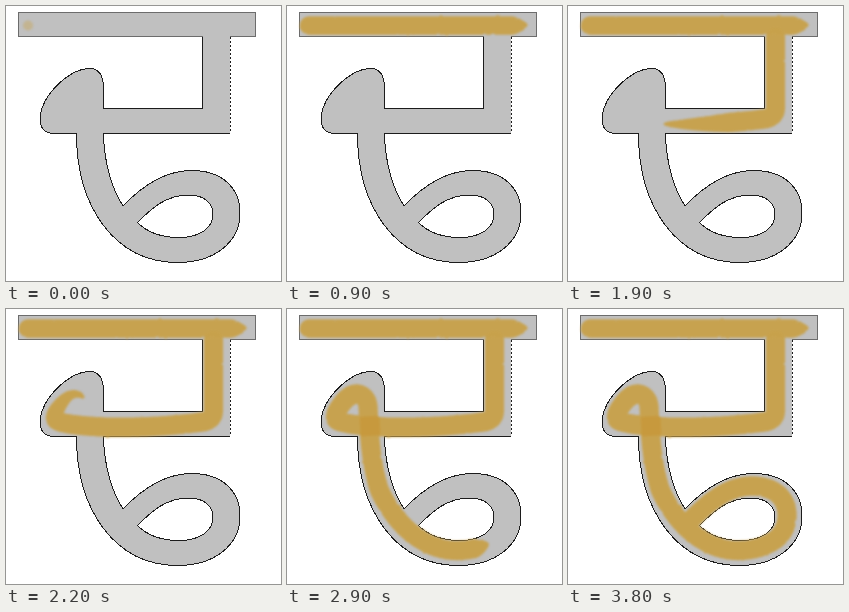
Recreate the animation shown at these times as an HTML page. Size 275x275 px, loop 3.9 s.

```html
<!DOCTYPE html>
<html lang="en">
<head>
<meta charset="utf-8">
<title>Letter tracing</title>
<style>
html, body { margin: 0; width: 100%; height: 100%; overflow: hidden; background: #fff; }
svg { display: block; width: 100vw; height: 100vh; }
</style>
</head>
<body>
<svg viewBox="0 0 275 275" xmlns="http://www.w3.org/2000/svg">
  <defs>
    <filter id="rough" filterUnits="userSpaceOnUse" x="0" y="0" width="275" height="275" color-interpolation-filters="sRGB">
      <feTurbulence type="fractalNoise" baseFrequency="0.12" numOctaves="2" seed="4" result="n"/>
      <feDisplacementMap in="SourceGraphic" in2="n" scale="2" xChannelSelector="R" yChannelSelector="G"/>
      <feGaussianBlur stdDeviation="0.9"/>
    </filter>
  </defs>
  <g fill="#c0c0c0" fill-rule="evenodd" shape-rendering="crispEdges">
    <path stroke="#1c1c1c"
      d="M224 127.5H97.5C98 157 106 183 117 200C136 180 158 164.5 186 164.5C216 164.5 234 182 234 207C234 238 206 256.5 172 256.5C108 256.5 70.5 200 70.5 127.5H48C38 127.5 34 122 34 112C36 88 64 62.5 84 62.5C94 62.5 97.5 71 97.5 83V102.5H196.5V30.5H224
      M131.5 216.5C146 202 160 189 183 189C198 189 207 197 207 208C207 222 194 231.5 173 231.5C156 231.5 141 226 131.5 216.5Z"/>
    <path stroke="#6c6c6c" d="M196.5 30.5H12.5V6.5H249.5V30.5H224"/>
    <path stroke="#c0c0c0" d="M197 30.5H224"/>
    <path stroke="#1c1c1c" stroke-dasharray="2 2" d="M224.5 31V127"/>
  </g>
  <g filter="url(#rough)" fill="#c8a24c">
    <path id="bar"/>
    <path id="body"/>
    <rect id="cross" x="73" y="107" width="20" height="20" rx="3" transform="rotate(-3 83 117)" fill="#c7973a" opacity="0.8"/>
  </g>
</svg>
<script>
const LOOP = 3900, STEP = 100;
const $ = id => document.getElementById(id);

function makePath(d) {
  const p = document.createElementNS("http://www.w3.org/2000/svg", "path");
  p.setAttribute("d", d);
  return p;
}

// Piecewise linear value through [time, value] pairs
function ramp(keys, t) {
  if (t <= keys[0][0]) return keys[0][1];
  for (let i = 1; i < keys.length; i++) {
    const [t0, v0] = keys[i - 1], [t1, v1] = keys[i];
    if (t <= t1) return v0 + (v1 - v0) * (t - t0) / (t1 - t0);
  }
  return keys[keys.length - 1][1];
}

// Each part continues where the previous one stops
const parts = [
  "M207.5 31V101Q207.5 112 196 113C165 117 130 119 97 118",
  "C80 117 62 116 51 112C44 109 53 96 60 89C68 82 79 84 81 97C82 120 83 150 92 180",
  "C105 210 133 241 169 241.5Q187 241.5 200 235",
  "C213 229 219 219 219 206C219 187 204 177 184 177C160 177 141 193 124 210"
];
const ends = parts.map((_, i) => makePath(parts.slice(0, i + 1).join("")).getTotalLength());

function stroke(el, d, radius, start, lengths, tapers) {
  const path = makePath(d), total = path.getTotalLength(), points = [];
  for (let s = 0; s <= total; s += 1.5) points.push([s, path.getPointAtLength(s)]);
  points.push([total, path.getPointAtLength(total)]);
  return t => {
    const head = ramp(lengths, t), taper = ramp(tapers, t);
    let out = "";
    if (t >= start) for (const [s, p] of points) {
      if (s > head) break;
      const k = taper > 0 ? Math.min(1, (head - s) / taper) : 1;
      const r = Math.max(radius * (0.15 + 0.85 * k ** 0.7), 5 * (1 - head / 30));
      out += `M${(p.x - r).toFixed(1)} ${p.y.toFixed(1)}a${r} ${r} 0 1 0 ${2 * r} 0a${r} ${r} 0 1 0 ${-2 * r} 0`;
    }
    el.setAttribute("d", out);
    el.setAttribute("opacity", Math.min(0.97, 0.4 + head / 40));
    return head;
  };
}

const drawBar = stroke($("bar"), "M22 19.5H239", 9.3, 0,
  [[0, 0], [500, 146], [720, 217]],
  [[0, 4], [100, 14]]);

const drawBody = stroke($("body"), parts.join(""), 9.7, 1300,
  [[1300, 4], [1900, ends[0]], [2500, ends[1]], [2900, ends[2]], [3400, ends[3]]],
  [[1300, 5], [1500, 20], [1900, 65], [2500, 36], [2900, 14], [3300, 14], [3400, 0]]);

function render(time) {
  const t = Math.floor((time % LOOP) / STEP) * STEP;
  drawBar(t);
  const head = drawBody(t);
  $("cross").style.display = head > ends[1] - 45 ? "" : "none";
}

const begin = performance.now();
function tick() {
  render(performance.now() - begin);
  requestAnimationFrame(tick);
}
tick();
</script>
</body>
</html>
```
